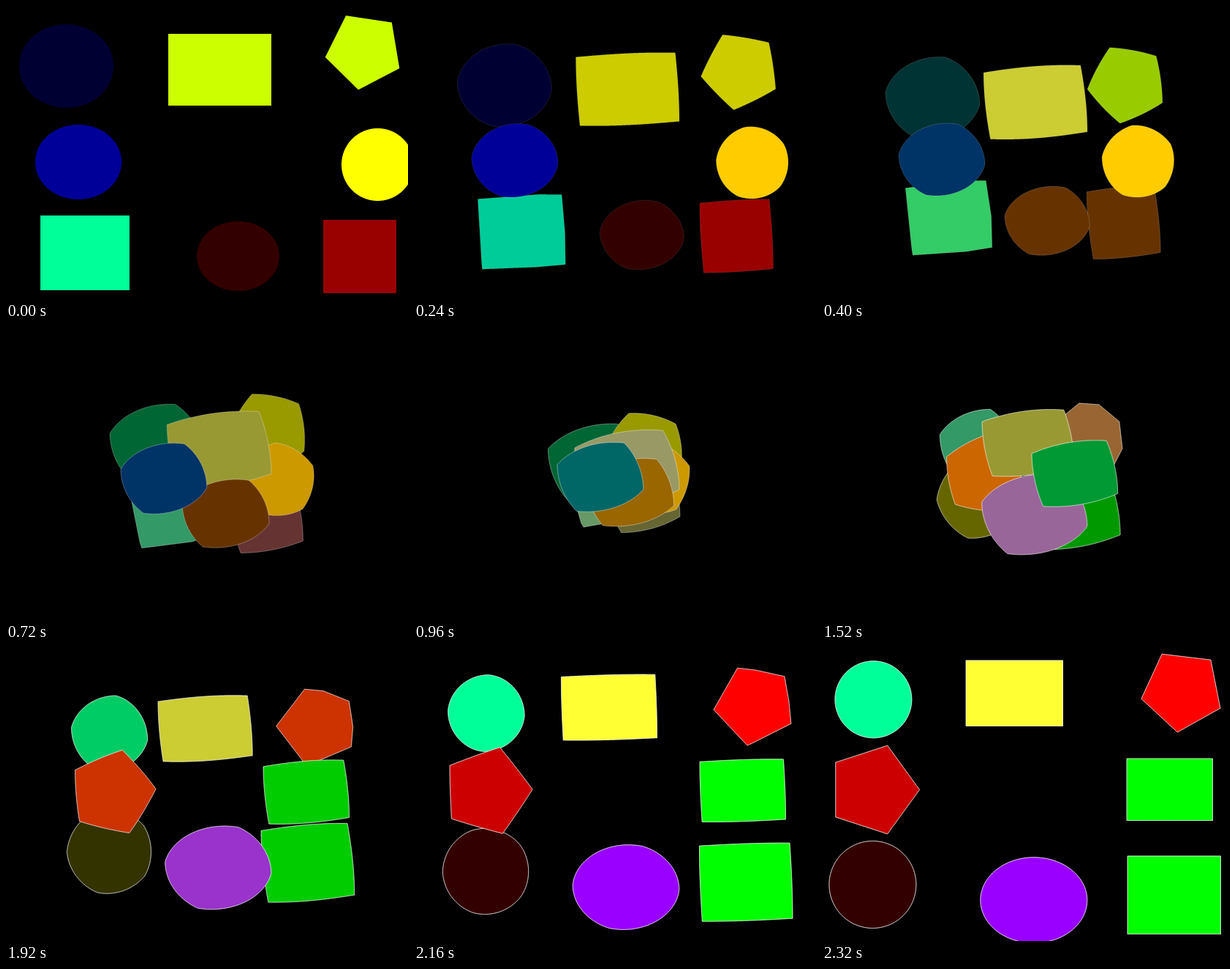
Recreate the animation shown at these times as an HTML page with a canvas. Size 550 by 400 pixels, loop 2400 ms.

```html
<!DOCTYPE html>
<html lang="en">
<head>
<meta charset="utf-8">
<title>Shape morph</title>
<style>
  html, body { margin: 0; width: 100%; height: 100%; overflow: hidden; background: #000; }
  canvas { display: block; width: 550px; height: 400px; }
</style>
</head>
<body>
<canvas id="stage" width="550" height="400"></canvas>
<script>
const ctx = document.getElementById('stage').getContext('2d');
const STEP = 80, COUNT = 30, SAMPLES = 720;
const lerp = (a, b, t) => a + (b - a) * t;

// An outline maps s in 0..1 to a point, clockwise at even speed.
function oval(cx, cy, rx, ry = rx, turn = -181) {
  return s => {
    const a = (turn + 360 * s) * Math.PI / 180;
    return [cx + rx * Math.cos(a), cy + ry * Math.sin(a)];
  };
}

function polygon(pts) {
  const sides = pts.map((p, i) => {
    const q = pts[(i + 1) % pts.length];
    return { p, q, len: Math.hypot(q[0] - p[0], q[1] - p[1]) };
  });
  const total = sides.reduce((sum, side) => sum + side.len, 0);
  return s => {
    let d = s * total, i = 0;
    while (i < sides.length - 1 && d > sides[i].len) d -= sides[i++].len;
    const { p, q, len } = sides[i];
    return [lerp(p[0], q[0], d / len), lerp(p[1], q[1], d / len)];
  };
}

const rect = (l, t, r, b) => polygon([[l, t], [r, t], [r, b], [l, b]]);

function pentagon(cx, cy, r, turn) {
  const corner = oval(cx, cy, r, r, turn);
  return polygon([0, 1, 2, 3, 4].map(i => corner(i / 5)));
}

// Start and end outline, start and end colour, back to front.
const shapes = [
  [oval(82.5, 82, 64.5, 57), rect(418, 284, 545.5, 390.5), [0, 2, 51], [0, 255, 0]],
  [pentagon(490, 61, 54, -117.5), oval(69.3, 323, 59.5, 59.5, -108), [204, 255, 0], [51, 0, 0]],
  [rect(47, 286, 169, 388), pentagon(493, 58.2, 57.2, -191.2), [0, 255, 153], [255, 0, 0]],
  [rect(434, 292, 534, 392), oval(70.3, 70.3, 52.5, 52.5, -180), [153, 0, 0], [0, 255, 153]],
  [oval(508.5, 216.5, 49.5, 49.5, -108), pentagon(70, 193.5, 63.5, -72), [239, 255, 0], [204, 0, 0]],
  [rect(222, 38, 363, 136), oval(289.8, 344.3, 73, 58.5), [189, 255, 0], [153, 0, 255]],
  [oval(317.5, 341.5, 56.5, 47.5), rect(197, 17, 329.5, 106.5), [51, 0, 0], [248, 255, 51]],
  [oval(99, 213, 59, 51), rect(417, 151, 534.5, 235.5), [0, 0, 153], [0, 255, 0]]
].map(([from, to, c0, c1]) => {
  const trace = f => Array.from({ length: SAMPLES }, (_, i) => f(i / SAMPLES));
  return { from: trace(from), to: trace(to), c0, c1 };
});

// Fills snap to six levels per channel.
const snap = v => Math.floor(v / 51 + 0.44) * 51;

function draw(t) {
  ctx.fillStyle = '#000';
  ctx.fillRect(0, 0, 550, 400);
  ctx.strokeStyle = `rgba(255,255,255,${t})`;
  ctx.lineWidth = 1;
  ctx.lineJoin = 'round';
  for (const { from, to, c0, c1 } of shapes) {
    ctx.beginPath();
    from.forEach(([x, y], i) => ctx.lineTo(lerp(x, to[i][0], t), lerp(y, to[i][1], t)));
    ctx.closePath();
    ctx.fillStyle = `rgb(${c0.map((c, i) => snap(lerp(c, c1[i], t)))})`;
    ctx.fill();
    ctx.stroke();
  }
}

const start = performance.now();
function tick() {
  const step = Math.floor(Math.max(0, performance.now() - start) / STEP) % COUNT;
  draw(step / (COUNT - 1));
  requestAnimationFrame(tick);
}
tick();
</script>
</body>
</html>
```
